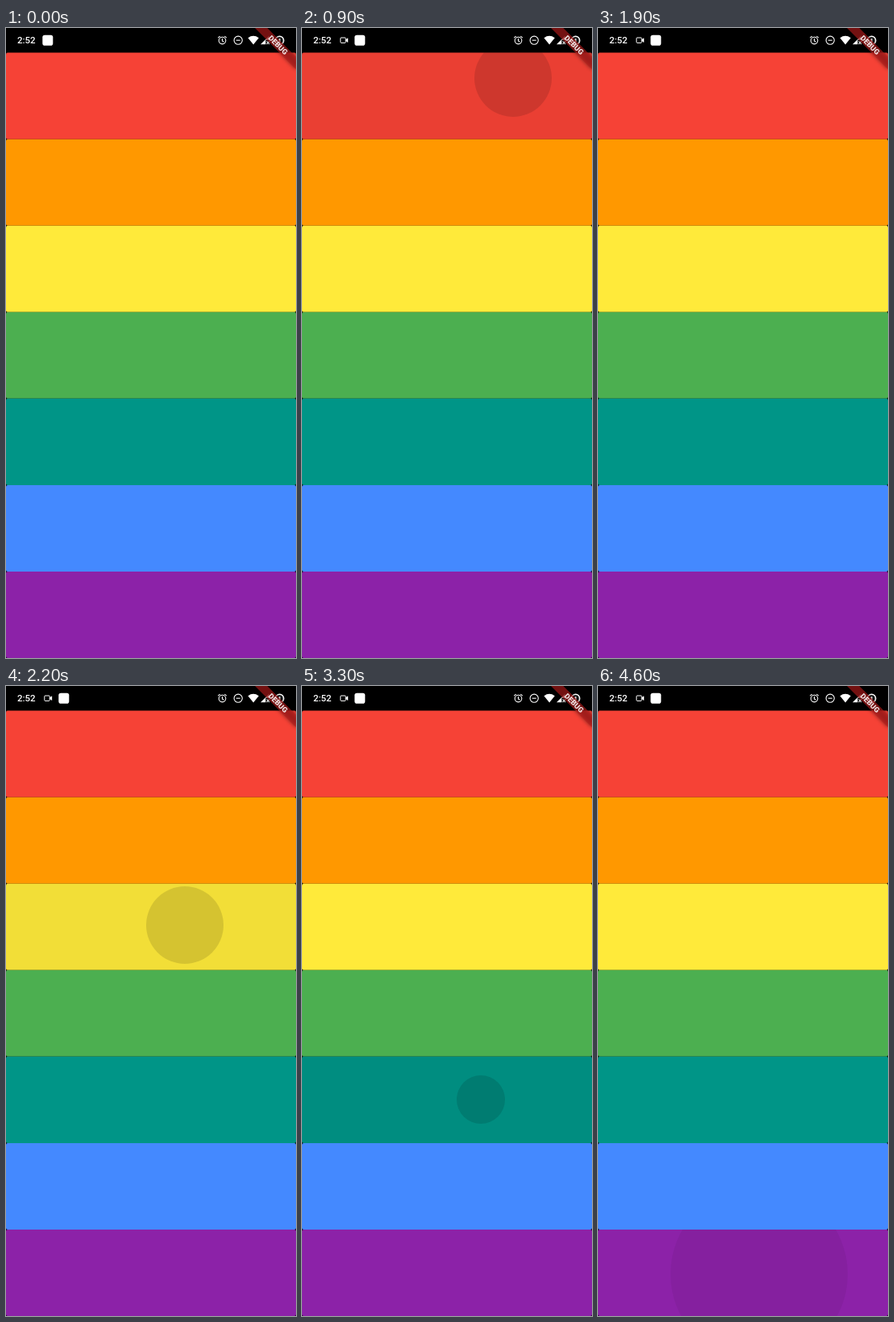
Recreate the animation shown at these times as an HTML page. Size 360 by 780 pixels, loop 4.7 s.

```html
<!DOCTYPE html>
<html lang="en">
<head>
<meta charset="utf-8">
<title>Ripple bands</title>
<style>
  html, body { margin: 0; width: 100%; height: 100%; overflow: hidden; background: #000; }
  svg { display: block; width: 360px; height: 780px; }
  text { font-family: Roboto, sans-serif; fill: #fff; }
</style>
</head>
<body>
<svg viewBox="0 0 360 780">
  <defs>
    <filter id="blur" x="-30%" y="-80%" width="160%" height="260%">
      <feGaussianBlur stdDeviation="2.6"/>
    </filter>
  </defs>
  <rect width="360" height="780"/>
  <g id="bands"></g>

  <text x="14" y="19" font-size="11.5" font-weight="500">2:52</text>
  <g id="camera" fill="none" stroke="#fff" stroke-width="1">
    <rect x="47.8" y="12" width="6.4" height="6.4" rx=".8"/>
    <path d="M54.2 14.6L57 12.6v5.2L54.2 15.8z" fill="#fff" stroke-width=".3"/>
  </g>
  <rect id="badge" x="45.3" y="8.7" width="13" height="13" rx="2.8" fill="#fff"/>

  <g fill="none" stroke="#fff" stroke-width="1.1">
    <circle cx="268.5" cy="15.6" r="4.3"/>
    <path d="M268.5 13v2.9l2 1.3M263.2 12.2l2.5-2.1M273.8 12.2l-2.5-2.1"/>
    <circle cx="288.2" cy="15.2" r="5.1"/>
    <path d="M285.7 15.2h5"/>
    <circle cx="339.6" cy="15.4" r="5" stroke-width="1.8"/>
    <path d="M339.6 13v4.8" stroke-width="2"/>
  </g>
  <path d="M300.4 12.2Q307 7.4 313.8 12.2L307.1 20.4z" fill="#fff"/>
  <path d="M316 20.2L326.6 9.8V14.8H322.4V20.2z" fill="#fff"/>
  <path d="M323.6 16.4l3.4 3.6m0-3.6l-3.4 3.6" stroke="#fff" stroke-width="1.1"/>

  <g transform="translate(360 0) rotate(45)">
    <rect x="-36" y="25.2" width="72" height="10.8" opacity=".5" filter="url(#blur)"/>
    <rect x="-36" y="25.2" width="72" height="10.8" fill="#b71c1c" fill-opacity=".63"/>
    <text x="-.8" y="33.9" font-size="9.2" font-weight="900" text-anchor="middle" opacity=".88">DEBUG</text>
  </g>
</svg>
<script>
const LOOP = 4700, STEP = 100, TOP = 30.6, PITCH = (780 - TOP) / 7;

// colour, tap x, tap y, tap time, visible time
const rows = [
  ['#f64236', 262, 62, 700, 500],
  ['#ff9800', 226, 190, 1300, 500],
  ['#ffea3a', 222, 296, 2000, 400],
  ['#4caf50', 216, 388, 2600, 300],
  ['#009587', 222, 512, 3200, 500],
  ['#4489ff', 227, 605, 3800, 300],
  ['#8c22a8', 200, 728, 4400, 300]
];

const group = document.getElementById('bands');
const camera = document.getElementById('camera');
const badge = document.getElementById('badge');

function add(parent, tag, attrs) {
  const el = document.createElementNS('http://www.w3.org/2000/svg', tag);
  for (const key in attrs) el.setAttribute(key, attrs[key]);
  return parent.appendChild(el);
}

const bands = rows.map(([fill, cx, cy, start, life], i) => {
  const y = TOP + i * PITCH;
  const box = { x: 0, y, width: 360, height: PITCH, rx: 2 };
  const clip = add(group, 'clipPath', { id: 'clip' + i });
  add(clip, 'rect', box);
  add(group, 'rect', { ...box, fill });
  const glow = add(group, 'rect', { ...box, opacity: 0 });
  const layer = add(group, 'g', { 'clip-path': `url(#clip${i})` });
  const splash = add(layer, 'circle', { cx, cy, r: 0, opacity: 0 });
  return { start, life, glow, splash };
});

// The splash creeps while pressed, then spreads and fades on release.
function drawBand({ start, life, glow, splash }, t) {
  const age = t - start;
  const on = age >= 0 && age < life;
  const hold = life - 200;
  const free = Math.max(0, age - hold);
  const fade = Math.max(0, 1 - free / 130);
  splash.setAttribute('r', on ? 12 + 0.18 * Math.min(age, hold) + 0.8 * free : 0);
  splash.setAttribute('opacity', on ? 0.03 + 0.09 * fade : 0);
  glow.setAttribute('opacity', on && !free ? Math.min(0.05, 0.03 + age * 0.0002) : 0);
}

function drawStatus(t) {
  const p = Math.min(1, t / 500);
  const slide = 1 - (1 - p) ** 3;
  badge.setAttribute('transform', `translate(${20 * slide} 0)`);
  camera.setAttribute('opacity', Math.max(0, (p - 0.3) / 0.7));
}

const origin = performance.now();
function frame() {
  const now = (performance.now() - origin) % LOOP;
  const t = Math.floor(now / STEP) * STEP;
  bands.forEach(band => drawBand(band, t));
  drawStatus(t);
  requestAnimationFrame(frame);
}
frame();
</script>
</body>
</html>
```
